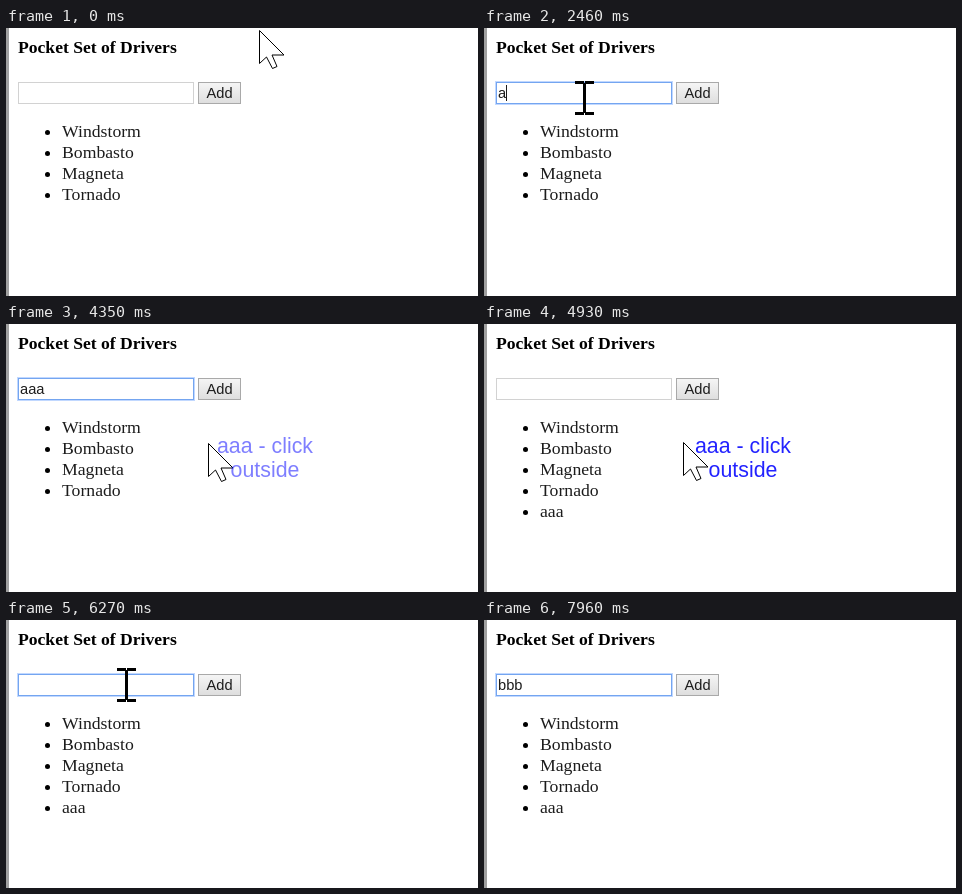
Recreate the animation shown at these times as an HTML page with a canvas. Size 472 by 268 pixels, loop 8 s.

```html
<!DOCTYPE html>
<html lang="en">
<head>
<meta charset="utf-8">
<title>List form</title>
<style>
  html, body { margin: 0; width: 100%; height: 100%; overflow: hidden; background: #fff; }
  canvas { display: block; }
</style>
</head>
<body>
<canvas id="stage" width="472" height="268"></canvas>
<script>
const ctx = document.getElementById('stage').getContext('2d');
const LOOP = 8000;
const SERIF = '"Liberation Serif", "Times New Roman", serif';
const SANS = '"Liberation Sans", Arial, sans-serif';
const INK = '#1c1c1c';
const FIELD = { x: 12, y: 54, w: 176, h: 22 };
const ITEMS = ['Windstorm', 'Bombasto', 'Magneta', 'Tornado'];

// Pointer waypoints: time, x, y
const PATH = [
  [0, 253, 2], [200, 253, 2], [790, 86, 72],
  [960, 86, 72], [1120, 86, 71],
  [2110, 86, 71], [2230, 97, 70],
  [2430, 97, 70], [2460, 100, 70], [2880, 202, 119],
  [4900, 202, 119], [5140, 121, 85], [5230, 108, 75], [5380, 120, 65],
  [7480, 120, 65], [7900, 211, 66], [LOOP, 211, 66]
];
const POINTER_GONE = 7945;

// Field states: time, focused, text, caret shown
const FIELD_STATES = [
  [0, false, '', false],
  [990, true, '', true],
  [1580, true, '', false],
  [2110, true, 'a', true],
  [2620, true, 'a', false],
  [3110, true, 'a', true],
  [3370, true, 'aa', true],
  [3700, true, 'aaa', true],
  [4230, true, 'aaa', false],
  [4570, false, '', false],
  [5680, true, '', true],
  [6270, true, '', false],
  [6770, true, '', true],
  [6830, true, 'b', true],
  [7190, true, 'bb', true],
  [7420, true, 'bbb', true],
  [7950, true, 'bbb', false]
];
const ITEM_ADDED = 4570;

const clamp = v => Math.max(0, Math.min(1, v));

function slope(i, axis) {
  const a = PATH[i], b = PATH[i + 1];
  return a && b ? (b[axis] - a[axis]) / (b[0] - a[0]) : 0;
}

// Harmonic mean keeps the curve from overshooting its waypoints
function tangent(i, axis) {
  const a = slope(i - 1, axis), b = slope(i, axis);
  return a * b > 0 ? 2 * a * b / (a + b) : 0;
}

function along(t, axis) {
  let i = 0;
  while (i < PATH.length - 2 && PATH[i + 1][0] <= t) i++;
  const a = PATH[i], b = PATH[i + 1], span = b[0] - a[0];
  const u = (t - a[0]) / span, v = 1 - u;
  return a[axis] * (1 + 2 * u) * v * v + b[axis] * (3 - 2 * u) * u * u
    + span * (tangent(i, axis) * u * v * v - tangent(i + 1, axis) * u * u * v);
}

function text(str, x, y, font, color = INK, align = 'left') {
  ctx.font = font;
  ctx.fillStyle = color;
  ctx.textAlign = align;
  ctx.fillText(str, x, y);
}

function frame(x, y, w, h, color) {
  ctx.strokeStyle = color;
  ctx.lineWidth = 1;
  ctx.strokeRect(x + 0.5, y + 0.5, w - 1, h - 1);
}

function drawField(t) {
  const { x, y, w, h } = FIELD;
  const [, focused, value, caret] = FIELD_STATES.filter(s => s[0] <= t).pop();
  if (focused) {
    frame(x - 1, y - 1, w + 2, h + 2, 'rgba(77,144,254,0.35)');
    frame(x, y, w, h, '#74a5f0');
  } else {
    frame(x, y, w, h, '#d2d2d2');
  }
  text(value, 14, 70, `14.67px ${SANS}`);
  if (caret) ctx.fillRect(Math.floor(14 + ctx.measureText(value).width), 57, 1, 16);
}

function drawButton() {
  const fill = ctx.createLinearGradient(0, 54, 0, 76);
  fill.addColorStop(0, '#f6f6f6');
  fill.addColorStop(1, '#dddddd');
  ctx.fillStyle = fill;
  ctx.fillRect(192, 54, 43, 22);
  frame(192, 54, 43, 22, '#a9a9a9');
  text('Add', 200.5, 70, `14.67px ${SANS}`);
}

function drawList(t) {
  const items = t >= ITEM_ADDED ? [...ITEMS, 'aaa'] : ITEMS;
  items.forEach((item, i) => {
    const y = 109 + i * 21;
    text(item, 56, y, `17.7px ${SERIF}`);
    ctx.fillStyle = '#000';
    ctx.beginPath();
    ctx.arc(41.5, y - 4.5, 2.5, 0, Math.PI * 2);
    ctx.fill();
  });
}

function drawNote(t) {
  ctx.globalAlpha = clamp((t - 4230) / 240) * clamp((5130 - t) / 230);
  ['aaa - click', 'outside'].forEach((line, i) =>
    text(line, 259, 129 + i * 24, `21.33px ${SANS}`, '#00f', 'center'));
  ctx.globalAlpha = 1;
}

function drawArrow() {
  const points = [[0, 0], [0, 33], [7, 26.5], [13, 38], [17.5, 36], [12.5, 24.5], [24.5, 24.5]];
  ctx.beginPath();
  points.forEach(([x, y]) => ctx.lineTo(x + 0.5, y + 0.5));
  ctx.closePath();
  ctx.fillStyle = '#fff';
  ctx.fill();
  ctx.strokeStyle = '#000';
  ctx.lineWidth = 1;
  ctx.stroke();
}

function drawBeam() {
  ctx.fillStyle = '#000';
  ctx.fillRect(-1, -15, 3, 30);
  for (const y of [-17, 14]) {
    ctx.fillRect(-9, y, 9, 3);
    ctx.fillRect(1, y, 9, 3);
  }
}

function drawPointer(t) {
  if (t >= POINTER_GONE) return;
  const x = Math.round(along(t, 1)), y = Math.round(along(t, 2));
  const inField = x >= FIELD.x && x < FIELD.x + FIELD.w
    && y >= FIELD.y && y < FIELD.y + FIELD.h;
  ctx.save();
  ctx.translate(x, y);
  inField ? drawBeam() : drawArrow();
  ctx.restore();
}

function draw(now) {
  const t = now % LOOP;
  ctx.fillStyle = '#fff';
  ctx.fillRect(0, 0, 472, 268);
  ctx.fillStyle = '#a0a0a0';
  ctx.fillRect(0, 0, 3, 268);
  text('Pocket Set of Drivers', 12, 25, `bold 17.6px ${SERIF}`, '#000');
  drawField(t);
  drawButton();
  drawList(t);
  drawPointer(t);
  drawNote(t);
}

const start = performance.now();
function tick() {
  draw(performance.now() - start);
  requestAnimationFrame(tick);
}
tick();
</script>
</body>
</html>
```
